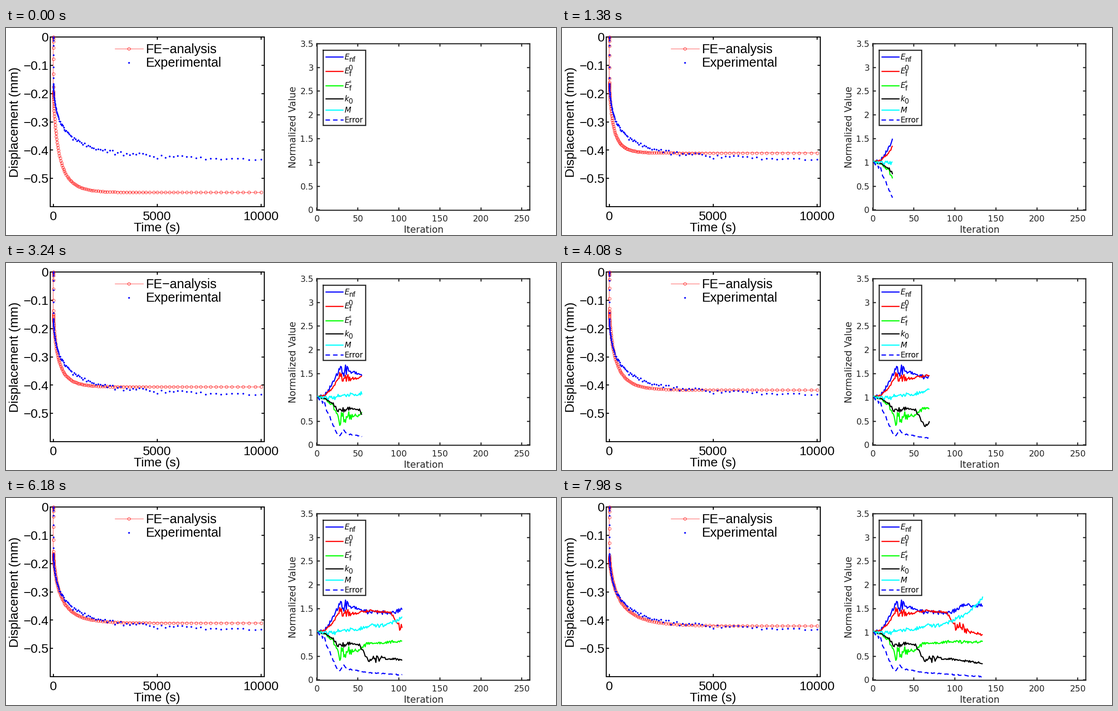
A matplotlib script that plays this animation: 1218 px wide and 460 px high, repeating every 8 s.

```python
import matplotlib.pyplot as plt
import numpy as np
from matplotlib.animation import FuncAnimation

W, H, DPI = 1218, 460, 72          # at 72 dpi one point is one pixel
STEPS, LOOP_MS = 134, 8000
SANS, DEJAVU, GREY = "Liberation Sans", "DejaVu Sans", "#262626"
DASH = (0, (4, 2.7))
rng = np.random.default_rng(4)

fig = plt.figure(figsize=(W / DPI, H / DPI), dpi=DPI, facecolor="white")
ax = fig.add_axes([0, 0, 1, 1])
ax.set(xlim=(0, W), ylim=(H, 0))
ax.axis("off")


def label(x, y, text, size, font=DEJAVU, color="black", ha="left", **kw):
    ax.text(x, y, text, fontsize=size, family=font, color=color, ha=ha,
            va="baseline", rotation_mode="anchor", **kw)


def stroke(xs, ys, color, width, **kw):
    return ax.plot(xs, ys, color=color, lw=width, **kw)[0]


def frame_box(x0, y0, x1, y1, color, width, xticks=(), yticks=(), tick=5):
    stroke([x0, x1, x1, x0, x0], [y0, y0, y1, y1, y0], color, width,
           solid_joinstyle="miter", zorder=1)
    for x in xticks:
        for y, inward in ((y0, tick), (y1, -tick)):
            stroke([x, x], [y, y + inward], color, width, zorder=1)
    for y in yticks:
        for x, inward in ((x0, tick), (x1, -tick)):
            stroke([x, x + inward], [y, y], color, width, zorder=1)


def time_px(t):
    return 104.5 + 0.04605 * np.asarray(t)


def depth_px(d):
    return 20.2 + 627.8 * np.asarray(d)


def iter_px(i):
    return 688.3 + 1.816 * np.asarray(i)


def value_px(v):
    return 404.3 - 105.55 * np.asarray(v)


# Left panel: displacement against time
times = (0, 5000, 10000)
depths = np.arange(6) / 10
frame_box(97.5, 20, 571.5, 397, "black", 2.2, time_px(times), depth_px(depths))
for t in times:
    label(time_px(t), 427, str(t), 28.3, SANS, ha="center")
for d in depths:
    label(94.5, depth_px(d) + 10.3, f"−{d:.1f}" if d else "0", 28.3, SANS, ha="right")
label(334, 452, "Time (s)", 28.3, SANS, ha="center")
label(27, 209.5, "Displacement (mm)", 28.3, SANS, ha="center", rotation=90)

RING = dict(marker="o", ms=6.4, mfc="none", mec="red", mew=0.8)
DOT = dict(marker="o", ms=3.9, mec="none", ls="none")
stroke([241, 304], [45.5, 45.5], "red", 0.7)
stroke([272.3], [45.5], "red", 0.7, **RING)
stroke([272.3], [76.5], "blue", 0, **DOT)
label(310, 56, "FE−analysis", 28.7, SANS)
label(310, 86, "Experimental", 28.7, SANS)

# A quick load ramp at t = 0, then creep sampled ever more sparsely
ramp = np.array([0, .03, .09, .21, .44, .735, 1])
creep_t = 1e4 * (np.arange(8, 106) / 105) ** 3.1
sample_t = np.r_[0 * ramp, creep_t]


def displacement(start, end, tau, power):
    creep = start + (end - start) * (1 - np.exp(-(creep_t / tau) ** power))
    return np.r_[start * ramp, creep]


scatter = rng.normal(0, .0035, len(sample_t)) * (sample_t > 300)
fe_line = stroke(time_px(sample_t), depth_px(0 * sample_t), "red", 0.7, zorder=3, **RING)
stroke(time_px(sample_t), depth_px(displacement(.145, .435, 572, .52) + scatter),
       "blue", 0, zorder=4, **DOT)

# Step, instant depth, final depth, time constant of the simulated creep
fit = np.array([
    (0, .177, .55, 282), (8, .173, .535, 270), (23, .147, .41, 196),
    (40, .144, .395, 187), (68, .128, .4175, 314), (115, .168, .408, 412),
    (133, .172, .421, 520)])


def simulated(step):
    start, end, tau = (np.interp(step, fit[:, 0], col) for col in fit.T[1:])
    return displacement(start, end, tau, .72)


# Right panel: normalized values against iteration
iters = np.arange(0, 251, 50)
values = np.arange(8) / 2
frame_box(688.5, 35, 1160, 404.5, GREY, 2.4, iter_px(iters), value_px(values))
for i in iters:
    label(iter_px(i), 429.5, str(i), 18.8, color=GREY, ha="center")
for v in values:
    label(681, value_px(v) + 7, f"{v:g}", 18.8, color=GREY, ha="right")
label(925, 455, "Iteration", 20.7, color=GREY, ha="center")
label(642.5, 220, "Normalized Value", 20.7, color=GREY, ha="center", rotation=90)

frame_box(702, 48.5, 796, 216, GREY, 2.5)
# Colour, line height, symbol, subscript, superscript
legend = [("blue", 64, "E", "nf", ""), ("red", 95.5, "E", "f", "0"),
          ("lime", 127.5, "E", "f", "ϵ"), ("black", 157, "k", "0", ""),
          ("cyan", 182, "M", "", ""), ("blue", 204, "Error", "", "")]
for color, y, symbol, sub, sup in legend:
    word = len(symbol) > 1
    stroke([707, 746.5], [y, y], color, 2.5, ls=DASH if word else "-",
           solid_capstyle="butt", dash_capstyle="butt")
    base = y + 5.6
    label(749.5, base, symbol, 17, style="normal" if word else "italic")
    label(759.5, base + 5.5, sub, 14.7)
    label(759.5, base - (11 if sup == "ϵ" else 7), sup, 9 if sup == "ϵ" else 14.7)

iteration = np.arange(1, STEPS + 1)
tracks = []


def track(color, keys, noise, bursts=(), **kw):
    """Key points joined by lines, with noise that swells at each burst."""
    level = noise + sum(amp * np.exp(-((iteration - mid) / 8) ** 2)
                        for mid, amp in bursts)
    v = np.interp(iteration, *zip(*keys)) + level * rng.normal(0, 1, STEPS).clip(-1.6, 1.6)
    line = stroke([], [], color, 2.5, zorder=3, solid_joinstyle="round",
                  solid_capstyle="butt", dash_capstyle="butt", **kw)
    tracks.append((line, iter_px(iteration), value_px(v)))


track("blue", [(1, 1.01), (9, 1.03), (20, 1.3), (29, 1.6), (45, 1.53), (62, 1.43),
               (95, 1.41), (108, 1.56), (134, 1.57)], .025, [(33, .06)])
track("red", [(1, 1.01), (10, 1.04), (20, 1.2), (27, 1.44), (42, 1.38), (65, 1.46),
              (90, 1.42), (102, 1.09), (134, .95)], .015, [(33, .06), (107, .07)])
track("lime", [(1, 1.02), (8, 1), (19, .86), (28, .53), (40, .6), (50, .62),
               (63, .78), (90, .8), (134, .8)], .02, [(33, .08)])
track("black", [(1, 1.02), (9, .97), (19, .88), (26, .73), (40, .77), (52, .74),
                (63, .4), (75, .46), (100, .43), (134, .35)], .013, [(30, .03), (72, .035)])
track("cyan", [(1, 1.02), (22, .98), (29, 1.06), (50, 1.05), (62, 1.14), (76, 1.14),
               (91, 1.2), (116, 1.41), (134, 1.72)], .025)
track("blue", [(1, 1), (9, .88), (24, .25), (28, .2), (33, .31), (37, .23),
               (60, .16), (100, .11), (134, .07)], .008, [(10, .02)], ls=DASH)


def draw(step):
    fe_line.set_ydata(depth_px(simulated(step)))
    for line, xs, ys in tracks:
        line.set_data(xs[:step + 1], ys[:step + 1])
    return [fe_line, *(line for line, _, _ in tracks)]


anim = FuncAnimation(fig, draw, frames=STEPS, interval=LOOP_MS / STEPS,
                     init_func=lambda: draw(0), repeat=True, repeat_delay=0)
plt.show()
```
